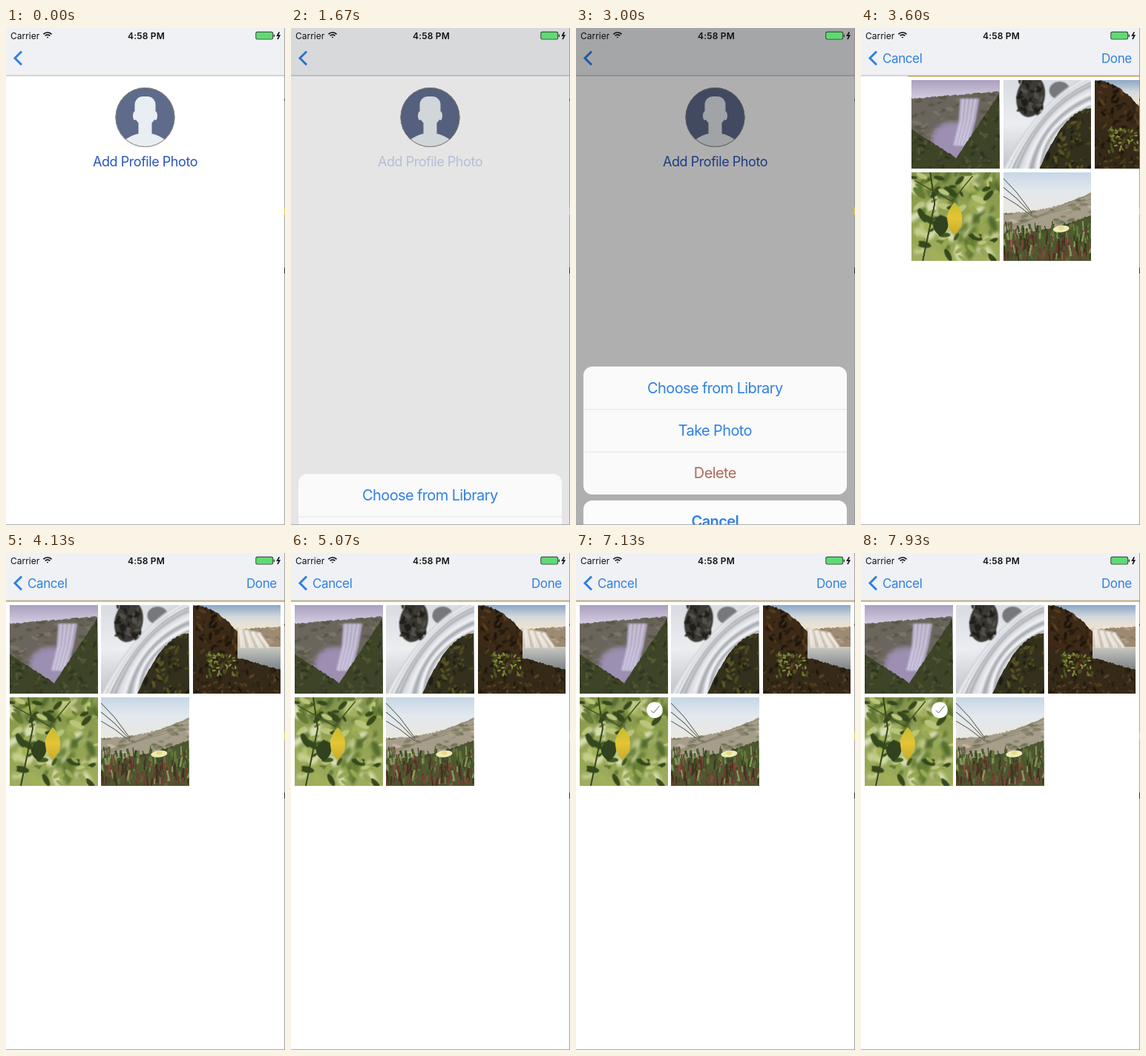
An HTML page with a canvas for the animation above (8 s loop, 376x668 px).

```html
<!DOCTYPE html>
<html lang="en">
<head>
<meta charset="utf-8">
<title>Add Profile Photo</title>
<style>
html, body { margin: 0; width: 100%; height: 100%; overflow: hidden; background: #fff; }
canvas { display: block; width: 376px; height: 668px; }
</style>
</head>
<body>
<canvas id="stage"></canvas>
<script>
const W = 376, H = 668, LOOP = 8000, TICK = 200 / 3;
const PRESS = 1530, OPEN = 1609, RELEASE = 1690, CLOSE = 2964, PUSH = 3421, SELECT = 5700;
const BLUE = '#2f80e6', INK = '#111', BAR = 64;
const SIZE = 118.5, PITCH = 123.4, ROW = 57.3, SHEET = 247;

const canvas = document.getElementById('stage');
const ratio = window.devicePixelRatio || 1;
canvas.width = W * ratio;
canvas.height = H * ratio;
let ctx = canvas.getContext('2d');
ctx.scale(ratio, ratio);

const clamp = v => Math.max(0, Math.min(1, v));

// Critically damped spring from 0 to 1.
function spring(t, start, speed = 18) {
  const x = Math.max(0, t - start) * speed / 1000;
  return 1 - (1 + x) * Math.exp(-x);
}

function rect(x, y, w, h, color) {
  ctx.fillStyle = color;
  ctx.fillRect(x, y, w, h);
}

function rounded(x, y, w, h, r, color) {
  ctx.fillStyle = color;
  ctx.beginPath();
  ctx.roundRect(x, y, w, h, r);
  ctx.fill();
}

function oval(x, y, rx, ry, color, turn = 0) {
  ctx.fillStyle = color;
  ctx.beginPath();
  ctx.ellipse(x, y, rx, ry, turn, 0, Math.PI * 2);
  ctx.fill();
}

function line(color, width, ...pts) {
  ctx.strokeStyle = color;
  ctx.lineWidth = width;
  ctx.beginPath();
  for (let i = 0; i < pts.length; i += 2) ctx.lineTo(pts[i], pts[i + 1]);
  ctx.stroke();
}

function ring(x, y, r, width, color, from = 0, to = 2) {
  ctx.strokeStyle = color;
  ctx.lineWidth = width;
  ctx.beginPath();
  ctx.arc(x, y, r, from * Math.PI, to * Math.PI);
  ctx.stroke();
}

function text(str, x, y, size, color, { weight = 400, align = 'left', spacing = 0 } = {}) {
  ctx.font = `${weight} ${size}px Inter, Roboto, sans-serif`;
  ctx.letterSpacing = spacing + 'px';
  ctx.textAlign = align;
  ctx.fillStyle = color;
  ctx.fillText(str, x, y);
}

// ---- Photos: soft tones and seeded texture on a square ----
let seed = 1;
function rand(a, b) {
  seed = seed * 16807 % 2147483647;
  return a + (b - a) * seed / 2147483647;
}
const pick = list => list[Math.floor(rand(0, list.length))];

function shade(colors, top, bottom) {
  const g = ctx.createLinearGradient(0, top, 0, bottom);
  colors.forEach((c, i) => g.addColorStop(i / (colors.length - 1), c));
  return g;
}

function soft(radius, draw) {
  ctx.filter = `blur(${radius}px)`;
  draw();
  ctx.filter = 'none';
}

function specks(n, top, colors, long, turn = 3) {
  for (let i = 0; i < n; i++) {
    const r = rand(long / 3, long);
    oval(rand(0, SIZE), rand(top, SIZE), r, r * 0.4, pick(colors), rand(-turn, turn));
  }
}

// Ground below the curve y(x), textured and cut off at x = right.
function land(y, colors, long, right = SIZE, turn = 3) {
  ctx.save();
  ctx.beginPath();
  ctx.moveTo(0, SIZE);
  for (let x = 0; x <= right; x += 2) ctx.lineTo(x, y(x) + rand(-1, 1));
  ctx.lineTo(right, SIZE);
  ctx.clip();
  rect(0, 0, SIZE, SIZE, colors[0]);
  soft(1, () => specks(260, 0, colors, long, turn));
  ctx.restore();
}

function fallsValley() {
  rect(0, 0, SIZE, SIZE, shade(['#aaa0bf', '#d3cbe0'], 0, 24));
  land(x => 25 - x * 0.08, ['#6b655e', '#595749', '#7a7468', '#616049'], 6, SIZE, 0.5);
  soft(7, () => oval(56, 82, 30, 26, '#9c8fb2'));
  soft(2, () => {
    for (let i = 0; i < 9; i++)
      line(i % 2 ? '#d8d2e8' : '#b6acca', 3.5, 67 + i * 2.8, 25, 65 + i * 2.4, 55, 57 + i * 2.2, 88);
  });
  land(x => x < 60 ? 66 + x * 0.65 : 105 - (x - 60) * 1.5,
    ['#3d4427', '#2d351e', '#4c562e', '#555739', '#3b3b29'], 5);
}

function silkStream() {
  rect(0, 0, SIZE, SIZE, shade(['#d9dce2', '#eceef1', '#c2c5ca'], 0, SIZE));
  soft(1.5, () => {
    oval(37, 22, 19, 28, '#3c3b35', 0.2);
    for (let i = 0; i < 45; i++)
      oval(37 + rand(-15, 15), 22 + rand(-22, 24), 5, 2, pick(['#1e1e1b', '#55514a', '#35342a']), rand(-2, 2));
    oval(76, 14, 14, 12, '#77787b');
  });
  soft(2, () => {
    for (let i = 0; i < 18; i++) {
      ctx.strokeStyle = pick(['#f4f5f7', '#a9acb2', '#e2e4e8', '#cdd0d5']);
      ctx.lineWidth = 3.5;
      ctx.beginPath();
      ctx.moveTo(SIZE, i * 2.4 - 6);
      ctx.quadraticCurveTo(52, 22 + i * 2.5, i * 3, 122);
      ctx.stroke();
    }
  });
  land(x => 38 + (SIZE - x) ** 2 / 60, ['#33311d', '#1d1b13', '#4b481e', '#5b5524', '#252617'], 6);
}

function cliffPool() {
  rect(0, 0, SIZE, SIZE, shade(['#8ba6c6', '#d5dade', '#f1e5cf'], 0, 32));
  land(x => 36 - x * 0.06, ['#9c8a72', '#867860', '#b39f83'], 6, SIZE, 0.4);
  rect(0, 56, SIZE, 40, shade(['#c9c9c3', '#84898b'], 56, 84));
  soft(2, () => {
    for (let i = 0; i < 11; i++)
      line(i % 3 ? '#f4f1eb' : '#d0c5b5', 4, 60 + i * 2.8, 31 + i * 0.6, 62 + i * 4, 57);
  });
  land(x => x * x / 100, ['#3d2b18', '#261c0f', '#573d20', '#322411', '#1b150d'], 6, 60);
  land(x => 54 + x * 0.28, ['#352918', '#1e180e', '#4d3b1d', '#5c4727', '#28200f'], 5);
  soft(0.7, () => {
    for (let i = 0; i < 50; i++)
      oval(rand(18, 62), rand(62, 98), 2.5, 1.3, pick(['#5f6c28', '#475722', '#838a3c']), rand(-2, 2));
  });
}

function leaf(x, y, half, len, color) {
  ctx.fillStyle = color;
  ctx.beginPath();
  ctx.moveTo(x, y);
  ctx.quadraticCurveTo(x + half * 2, y + len * 0.5, x, y + len);
  ctx.quadraticCurveTo(x - half * 2, y + len * 0.5, x, y);
  ctx.fill();
}

function yellowLeaf() {
  rect(0, 0, SIZE, SIZE, shade(['#84934f', '#92a350', '#a0ad62'], 0, SIZE));
  soft(4, () => specks(80, 0, ['#c6cf8d', '#d9deb2', '#a1b158', '#536b2d', '#6a8138'], 16));
  soft(1.2, () => specks(70, 0, ['#40591f', '#647b32', '#96a853', '#b9c57a', '#36491d'], 11, 1.2));
  soft(0.6, () => {
    line('#354620', 2, 25, 0, 31, 42, 15, SIZE);
    line('#465527', 1.5, 4, 11, 54, 39, 82, 5);
    leaf(39, 57, 10, 29, '#30421e');
    leaf(58, 40, 10, 44, shade(['#c5bd2e', '#e4c536', '#c9ab2a'], 40, 84));
  });
}

function duneFlower() {
  rect(0, 0, SIZE, SIZE, shade(['#c7d7e6', '#e3e9ee', '#e8e7e3'], 0, 50));
  land(x => 55 - x * x / 500, ['#a69d8a', '#bfb4a2', '#858169', '#717557'], 6, SIZE, 0.4);
  land(x => 82 - x * x / 560, ['#4c5631', '#62703d', '#583f2c', '#3b3d26'], 5);
  soft(0.5, () => {
    for (let i = 0; i < 230; i++) {
      const x = rand(0, SIZE), y = 78 + i * 0.19, h = rand(6, 15);
      const tones = rand(78, 122) < y ? ['#6b3b31', '#7d4238', '#42331f', '#53592f']
        : ['#65783b', '#4a602c', '#87975a', '#384624'];
      line(pick(tones), rand(1, 3.2), x, y, x + rand(-3, 3), y - h);
    }
    for (let i = 0; i < 3; i++) line('#535947', 0.9, 0, 8 + i * 12, 18, 27 + i * 8, 39, 55 + i * 2);
    for (let i = 0; i < 3; i++) line('#858269', 0.8, SIZE, 29 + i * 7, 80, 44 + i * 3, 0, 80 - i * 3);
    oval(78, 76, 11, 4.5, '#efeab9', -0.1);
    oval(78, 75, 4, 2.5, '#e5dc82');
  });
}

function paint(draw, index) {
  const tile = document.createElement('canvas');
  tile.width = tile.height = SIZE * 2;
  const main = ctx;
  ctx = tile.getContext('2d');
  ctx.scale(2, 2);
  seed = 97 + index * 1013;
  draw();
  ctx = main;
  return tile;
}

const photos = [fallsValley, silkStream, cliffPool, yellowLeaf, duneFlower].map(paint);

// ---- Screens ----
function avatar(x, y) {
  const skin = '#e9eef2';
  ctx.save();
  ctx.translate(x, y);
  oval(0, 0, 40, 40, '#5e6b8b');
  ctx.clip();
  rounded(-14, -28, 28, 38, [11, 11, 13, 13], skin);
  for (const side of [-1, 1]) oval(side * 14, -2, 2.5, 6, skin);
  rect(-9, 4, 18, 22, skin);
  oval(0, 46, 34, 25, skin);
  ctx.restore();
  ring(x, y, 39.6, 1, '#89847e');
}

function profile(t) {
  avatar(187.5, 120);
  ctx.globalAlpha = t < PRESS ? 1 : 0.25 + 0.75 * clamp((t - RELEASE) / 250);
  text('Add Profile Photo', 187.5, 186, 18, '#2a55be', { align: 'center', spacing: -0.45 });
  ctx.globalAlpha = 1;
}

function picker(t, x) {
  rect(x, BAR, W, 1.5, '#c4ad68');
  photos.forEach((photo, i) => {
    ctx.drawImage(photo, x + 5 + i % 3 * PITCH, 70 + Math.floor(i / 3) * 124, SIZE, SIZE);
  });
  if (t >= SELECT) {
    oval(106, 211, 10.8, 10.8, '#fff');
    line('#666b63', 1, 101, 211.5, 104.5, 215, 112.5, 205.5);
  }
}

function navBar(push) {
  rect(0, 0, W, BAR, '#f0f1f4');
  rect(0, BAR - 0.5, W, 1, '#b0b0b2');
  line(BLUE, 3, 21, 31.5, 12, 40.5, 21, 49.5);
  ctx.globalAlpha = clamp(push * 1.25);
  text('Cancel', 29, 47, 17, BLUE, { spacing: -0.4 });
  text('Done', 324, 47, 17, BLUE, { spacing: -0.4 });
  ctx.globalAlpha = 1;
}

function sheet(top) {
  const label = (str, y, color = BLUE, weight = 400) =>
    text(str, 187.3, y + 35.5, 20, color, { weight, align: 'center', spacing: -0.62 });
  rounded(10, top, 355, 3 * ROW, 12, '#fafafa');
  for (const row of [1, 2]) rect(10, top + row * ROW, 355, 0.8, '#dedee0');
  label('Choose from Library', top);
  label('Take Photo', top + ROW);
  label('Delete', top + 2 * ROW, '#ad6b5a');
  const cancelTop = top + 3 * ROW + 8;
  rounded(10, cancelTop, 355, ROW, 12, '#fcfcfc');
  label('Cancel', cancelTop, BLUE, 600);
}

function statusBar() {
  text('Carrier', 6, 14.5, 12, INK);
  text('4:58 PM', 189, 14.5, 12, INK, { weight: 600, align: 'center', spacing: 0.2 });
  for (const r of [1, 4.5, 7.6]) ring(56, 13.6, r, 1.7, INK, -0.76, -0.24);

  rounded(336.3, 4.8, 23.8, 10.8, 2.5, '#303830');
  rounded(337.2, 5.7, 22, 9, 1.7, '#5fda74');
  rounded(360.6, 8.4, 1.4, 3.8, 0.7, '#303830');
  line(INK, 1.6, 368.3, 5.5, 365.6, 10.1, 368.7, 10.1, 366, 15);
}

function edges() {
  rect(W - 0.8, 0, 0.8, H, '#8f8f8f');
  rect(0, H - 0.8, W, 0.8, '#9a9a9a');
  rect(W - 1, 95, 1, 3, '#555');
  rect(W - 1, 241, 1, 10, '#d6cf4a');
  rect(W - 1, 322, 1, 8, '#333');
}

function render(t) {
  const push = spring(t, PUSH);
  rect(0, 0, W, H, '#fff');
  if (push) picker(t, push > 0.999 ? 0 : W * (1 - push));
  else profile(t);
  navBar(push);
  if (push) rect(W * (1 - push), BAR, W, 1.2, '#c4ad68');

  const dim = 0.4 * (spring(t, OPEN, 17) - spring(t, CLOSE, 24));
  if (dim > 0.002) rect(0, 0, W, H, `rgba(0,0,0,${dim})`);
  const shown = spring(t, OPEN) - spring(t, CLOSE);
  if (shown > 0.002) sheet(H - SHEET * shown);

  statusBar();
  edges();
}

const origin = performance.now();
function frame() {
  const t = (performance.now() - origin) % LOOP;
  // The picture advances at 15 steps per second.
  render(Math.floor((t + 4) / TICK) % (LOOP / TICK) * TICK);
  requestAnimationFrame(frame);
}
frame();
</script>
</body>
</html>
```
